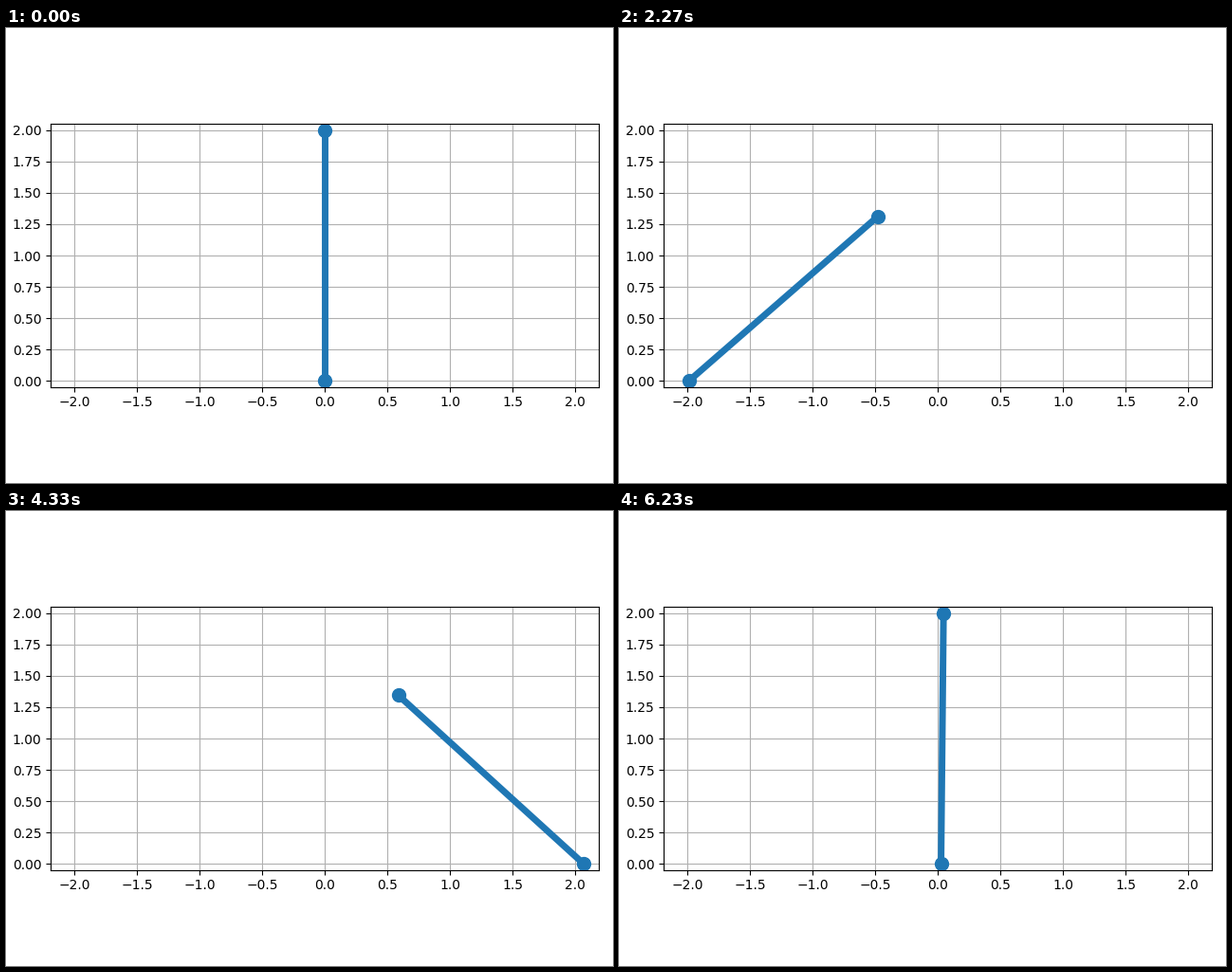
These frames come from a looping animation (640x480 px, 6.26 s). A matplotlib script:

```python
import numpy as np
import matplotlib.pyplot as plt
from matplotlib.animation import FuncAnimation

W, H, DPI = 640, 480, 100
FRAMES, FPS, LOOP_MS = 188, 30, 6260
LENGTH = 2.0


def angle(t):
    """Tilt of the rod, leaning right when positive."""
    return 0.6 * np.sin(t) - 0.4 * np.sin(2 * t)


def angle_acc(t):
    return -0.6 * np.sin(t) + 1.6 * np.sin(2 * t)


# The base balances an inverted pendulum (g = l = 1):
#   x'' cos(angle) = sin(angle) - angle''
# The acceleration is odd and 2*pi periodic, so integrate its sine series.
N = 256
grid = np.pi * np.arange(1, N) / N
acc = (np.sin(angle(grid)) - angle_acc(grid)) / np.cos(angle(grid))
orders = np.arange(1, 41)
coef = -(2 / N) * np.sin(np.outer(orders, grid)) @ acc / orders**2


def base(t):
    return coef @ np.sin(orders * t)


fig = plt.figure(figsize=(W / DPI, H / DPI), dpi=DPI)
ax = fig.add_axes([47.1 / W, 15 / H, 577.9 / W, 450 / H])
ax.set_aspect("equal")
ax.set_xlim(-2.189, 2.189)
ax.set_ylim(-0.05, 2.05)
ax.set_xticks(np.arange(-2, 2.1, 0.5))
ax.set_yticks(np.arange(0, 2.1, 0.25))
ax.grid()
rod, = ax.plot([], [], "o-", lw=5, ms=10)


def draw(i):
    t = i / FPS
    x, a = base(t), angle(t)
    rod.set_data([x, x + LENGTH * np.sin(a)], [0, LENGTH * np.cos(a)])
    return rod,


anim = FuncAnimation(fig, draw, frames=FRAMES, interval=LOOP_MS / FRAMES,
                     init_func=lambda: draw(0), repeat=True, repeat_delay=0)
plt.show()
```
